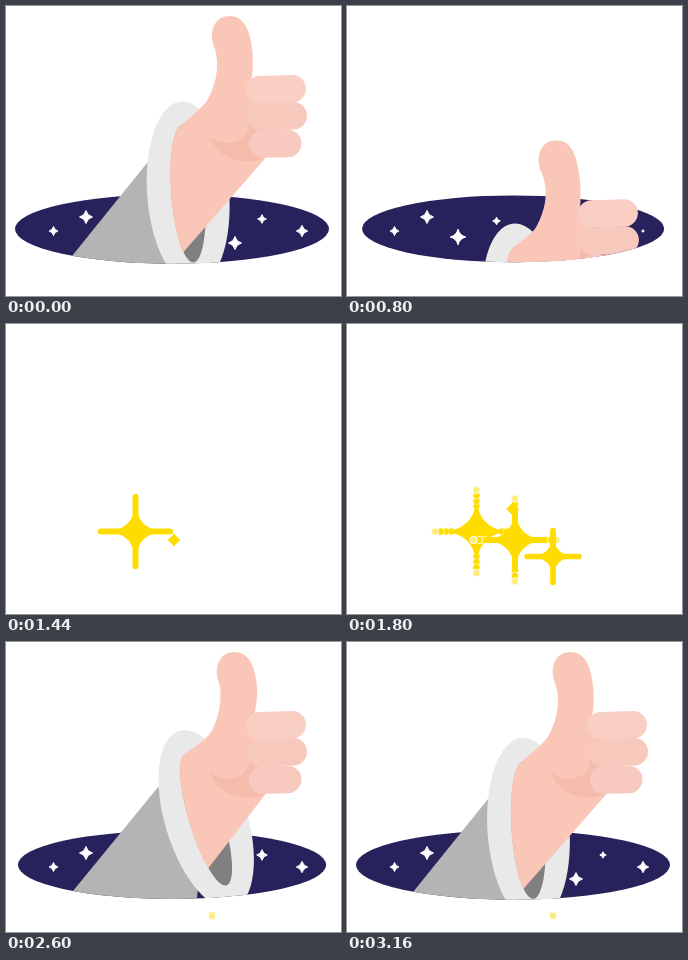
These frames come from a looping animation (335x290 px, 3.2 s). An HTML page:

```html
<!DOCTYPE html>
<html lang="en">
<head>
<meta charset="utf-8">
<title>Thumbs up</title>
<style>
  html, body { margin: 0; width: 100%; height: 100%; overflow: hidden; background: #fff; }
  svg { display: block; width: 100vw; height: 100vh; }
</style>
</head>
<body>
<svg viewBox="0 0 335 290">
  <defs>
    <clipPath id="holeClip"><ellipse id="holeShape"/></clipPath>
    <clipPath id="armClip"><path id="armShape"/></clipPath>
  </defs>
  <g id="sparkles"></g>
  <rect id="wipeBand" y="180" width="335" height="90" fill="#fff"/>
  <rect id="wipeTop" width="335" height="180" fill="#fff"/>
  <ellipse id="hole" fill="#28225c"/>
  <g id="stars" clip-path="url(#holeClip)" fill="#fff" stroke="#fff" stroke-linejoin="round"></g>
  <g id="armWindow" clip-path="url(#armClip)">
    <g id="arm">
      <path id="sleeve" fill="#b4b4b4"/>
      <ellipse id="cuff" rx="41" ry="92.5" fill="#e9e9e9"/>
      <ellipse id="lining" rx="16.8" ry="69" fill="#808080"/>
      <path id="forearm" fill="#fac6b8" stroke="#fac6b8" stroke-width=".8"/>
      <g id="hand">
        <path d="M203 126C207 150 235 162 258 152L262 120L230 100Z" fill="#f5bbab"/>
        <ellipse id="knuckle" cx="250" cy="80" fill="#fac6b8"/>
        <path id="thumb" fill="#fac6b8"/>
        <g id="fingers"></g>
      </g>
    </g>
  </g>
</svg>
<script>
const LOOP = 3200;
const $ = id => document.getElementById(id);
const clamp = v => Math.min(1, Math.max(0, v));
const span = (t, from, to) => clamp((t - from) / (to - from));
const mix = (a, b, k) => a + (b - a) * k;
const smooth = p => p * p * (3 - 2 * p);

function set(el, attrs) {
  for (const key in attrs) el.setAttribute(key, attrs[key]);
  return el;
}
function add(parent, tag, attrs = {}) {
  const el = document.createElementNS('http://www.w3.org/2000/svg', tag);
  parent.appendChild(el);
  return set(el, attrs);
}
const show = (el, on) => set(el, { visibility: on ? 'visible' : 'hidden' });

// Four-pointed star with concave sides.
function starPath(x, y, r, waist) {
  const w = r * waist;
  return `M${x} ${y - r}Q${x + w} ${y - w} ${x + r} ${y}Q${x + w} ${y + w} ${x} ${y + r}` +
    `Q${x - w} ${y + w} ${x - r} ${y}Q${x - w} ${y - w} ${x} ${y - r}Z`;
}

const stars = [
  { x: 80, y: 211, r: 7, dim: 320 },
  { x: 47.5, y: 225, r: 5, dim: 1900 },
  { x: 111, y: 231, r: 8.3, dim: 1500 },
  { x: 149.5, y: 215, r: 4.3, dim: 1300 },
  { x: 229, y: 237, r: 7, dim: 2750 },
  { x: 256, y: 213, r: 5.8, dim: 3080 },
  { x: 296, y: 225, r: 6.2, dim: 800 }
].map(s => ({ ...s, el: add($('stars'), 'path') }));

const YELLOW = '#ffdc00', PALE = '#ffec80';
const GROWTH = 0.15, REACH = 45.5;
const sparkles = [
  { x: 129.5, y: 207.5, start: 1190 },
  { x: 168, y: 216, start: 1400 },
  { x: 206, y: 232.5, start: 1610 },
  { x: 165.5, y: 185, start: 1760 }
].map(s => {
  const g = add($('sparkles'), 'g');
  const rings = [];
  for (const back of [20, 15, 9.5, 4]) {
    for (const [dx, dy] of [[0, -1], [1, 0], [0, 1], [-1, 0]]) {
      const d = REACH - back;
      const el = add(g, 'circle', {
        cx: s.x + dx * d, cy: s.y + dy * d, r: 3.7,
        fill: back === 4 ? PALE : YELLOW, stroke: '#fff', 'stroke-width': 0.8
      });
      rings.push({ d, el });
    }
  }
  const arms = add(g, 'path', { stroke: YELLOW, 'stroke-linecap': 'round' });
  const core = add(g, 'path', { fill: YELLOW });
  return { ...s, g, rings, arms, core };
});

[[240, 69.5, 60, '#f9cfc4'], [241, 96.5, 60, '#f7c8bc'], [243, 124, 52.5, '#f8cabf']]
  .forEach(([x, y, width, fill]) => add($('fingers'), 'rect', {
    x, y, width, height: 27.5, rx: 13.7, fill, transform: `rotate(-1.5 ${x + width / 2} ${y + 14})`
  }));

function drawHole(t) {
  const scale = t < 1500
    ? 1 - span(t, 700, 1056) ** 2.6
    : 1 - (1 - span(t, 2035, 2805)) ** 3;
  const cx = 168.5 - 2.5 * scale, cy = 217.5 + 5.5 * scale;
  const rx = 157 * scale, ry = 34.7 * scale;
  for (const id of ['hole', 'holeShape']) set($(id), { cx, cy, rx, ry });
  set($('armShape'), {
    d: `M${cx - rx} ${cy}V-20H${cx + rx}V${cy}A${rx} ${ry} 0 0 1 ${cx - rx} ${cy}Z`
  });
  show($('hole'), scale > 0);
  show($('stars'), scale > 0.15);
}

function drawStars(t) {
  for (const s of stars) {
    const gap = Math.abs(t - s.dim);
    const away = Math.min(gap, LOOP - gap) / 100;
    const r = s.r * (1 - 0.7 * Math.exp(-away * away));
    set(s.el, { d: starPath(s.x, s.y, r - 0.5, 0.2), 'stroke-width': 1 });
  }
}

function drawSparkles(t) {
  for (const s of sparkles) {
    const age = t - s.start, peak = REACH / GROWTH;
    show(s.g, age > 0);
    if (age <= 0) continue;
    const shrinking = age > peak;
    const r = shrinking ? Math.max(REACH * 0.45, REACH - (age - peak) * GROWTH) : age * GROWTH;
    const width = Math.min(6, r * 0.2), reach = r - width / 2;
    set(s.arms, {
      d: `M${s.x - reach} ${s.y}H${s.x + reach}M${s.x} ${s.y - reach}V${s.y + reach}`,
      'stroke-width': width
    });
    const waist = 0.5 * (1 - span(r, 6, 22));
    const coreSize = shrinking ? Math.max(r, REACH * 0.75) : r * mix(1, 0.85, span(r, 6, 22));
    set(s.core, { d: starPath(s.x, s.y, coreSize, waist) });
    for (const ring of s.rings) show(ring.el, shrinking && ring.d > r - 4);
  }
  show($('wipeBand'), t >= 2120);
  show($('wipeTop'), t >= 2320);
}

function drawArm(t) {
  const visible = t < 1020 || t > 2120;
  show($('armWindow'), visible);
  if (!visible) return;

  const fall = t < 1500 ? ((Math.max(t, 600) - 600) / 200) ** 2 : 0;
  const rise = t > 2000 ? (1 - span(t, 2120, 2560)) ** 2 : 0;
  const fold = t > 2000 ? 1 - smooth(span(t, 2270, 2540)) : 0;
  const sway = t > 2000 && t < 2600
    ? 1
    : 0.5 + 0.51 * Math.cos((t + LOOP - 2600) % LOOP / 1060 * 2 * Math.PI);
  const lean = 5 * (sway - 1.3 * Math.min(fall, 1));

  set($('arm'), { transform: `translate(${-9 * fall - 127 * rise} ${123 * fall + 307 * rise})` });
  set($('hand'), { transform: `rotate(${-90 * fold} 256.5 111.5)` });
  set($('knuckle'), { rx: 32 * fold, ry: 30 * fold });

  const cx = mix(181.5, 200, sway), cy = mix(188, 177.5, sway);
  const tilt = mix(-4, -17, sway) + 60 * rise;
  const place = { transform: `translate(${cx} ${cy}) rotate(${tilt})` };
  set($('cuff'), place);
  set($('lining'), place);
  set($('sleeve'), {
    d: `M58 260L${mix(141, 152, sway)} ${mix(157, 145, sway)}L${cx} ${cy}L${mix(170, 190, sway)} 262Z`
  });

  // The skin follows the left rim of the lining.
  const rim = deg => {
    const a = deg * Math.PI / 180, b = tilt * Math.PI / 180;
    const x = 16.8 * Math.cos(a), y = 69 * Math.sin(a);
    return [cx + x * Math.cos(b) - y * Math.sin(b), cy + x * Math.sin(b) + y * Math.cos(b)];
  };
  const top = rim(264), low = rim(mix(123, 137, sway));
  set($('forearm'), {
    d: `M${top}A16.8 69 ${tilt} 0 0 ${low}L260 151L252 80L207 88Q200 99 ${top}Z`
  });
  const x = (v, part = 1) => v + lean * part;
  set($('thumb'), {
    d: `M178 125C187 112 ${x(200, .3)} 101 ${x(206, .4)} 84C${x(211, .5)} 72 ${x(213, .6)} 56 ${x(208.5)} 42` +
      `C${x(202)} 28 ${x(207)} 10 ${x(223.5)} 10C${x(235)} 10 ${x(241)} 19 ${x(244)} 32` +
      `C${x(248.5)} 50 ${x(247, .6)} 72 ${x(242, .3)} 90L243 123C238 138 218 141 203 130Z`,
    transform: `translate(225 110) scale(${1 - 0.5 * fold}) translate(-225 -110)`
  });
}

function render(t) {
  drawSparkles(t);
  drawHole(t);
  drawStars(t);
  drawArm(t);
}

const began = performance.now();
function tick() {
  render((performance.now() - began) % LOOP);
  requestAnimationFrame(tick);
}
render(0);
requestAnimationFrame(tick);
</script>
</body>
</html>
```
